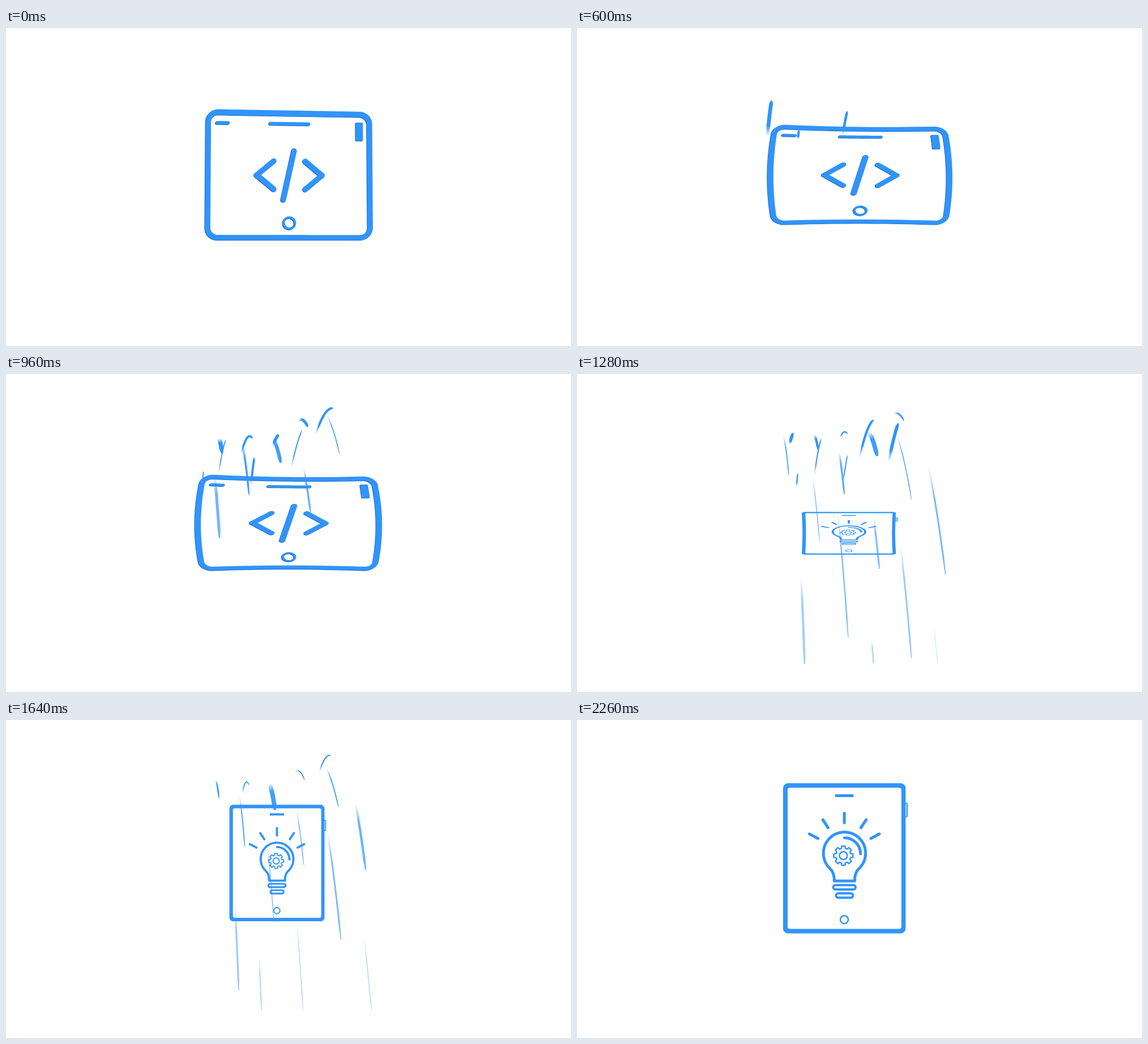
Recreate the animation shown at these times as an HTML page with a canvas. Size 998 by 561 pixels, loop 2.5 s.

```html
<!DOCTYPE html>
<html lang="en">
<head>
<meta charset="utf-8">
<title>Tablet morph</title>
<style>
html, body { margin: 0; width: 100%; height: 100%; overflow: hidden; background: #fff; }
canvas { display: block; width: 998px; height: 561px; }
</style>
</head>
<body>
<canvas id="stage" width="998" height="561"></canvas>
<script>
const ctx = document.getElementById('stage').getContext('2d');
const BLUE = '#3194fb', CLEAR = 'rgba(49,148,251,0)', SHADE = '#2272c8';
const LOOP = 2500, STEP = 40, SWAP = 1120;
const TAU = Math.PI * 2, QUARTER = Math.PI / 2;

// Smooth interpolation through [time, value] pairs.
function track(t, ...keys) {
  if (t <= keys[0][0]) return keys[0][1];
  for (let i = 1; i < keys.length; i++) {
    const [a, va] = keys[i - 1], [b, vb] = keys[i];
    if (t > b) continue;
    const u = (t - a) / (b - a);
    return va + (vb - va) * u * u * (3 - 2 * u);
  }
  return keys[keys.length - 1][1];
}

function trace(points) {
  points.forEach(([x, y], i) => i ? ctx.lineTo(x, y) : ctx.moveTo(x, y));
  ctx.closePath();
}

// ---- Outlines as point lists, so that they can be bent ----
function arc(x, y, r, from = 0, to = TAU, n = 24) {
  return Array.from({ length: n + 1 }, (_, i) => {
    const a = from + (to - from) * i / n;
    return [x + r * Math.cos(a), y + r * Math.sin(a)];
  });
}

function split(points, n = 12) {
  return points.flatMap(([x, y], i) => {
    const [p, q] = points[(i + 1) % points.length];
    const k = Math.hypot(p - x, q - y) > 20 ? n : 1;
    return Array.from({ length: k }, (_, j) => [x + (p - x) * j / k, y + (q - y) * j / k]);
  });
}

function roundBox(l, t, r, b, c) {
  const corners = [[l + c, t + c], [r - c, t + c], [r - c, b - c], [l + c, b - c]];
  return split(corners.flatMap(([x, y], i) => arc(x, y, c, (i - 2) * QUARTER, (i - 1) * QUARTER)));
}

function bar(x0, y0, x1, y1, w) {
  const a = Math.atan2(y1 - y0, x1 - x0);
  return split([...arc(x1, y1, w / 2, a - QUARTER, a + QUARTER),
    ...arc(x0, y0, w / 2, a + QUARTER, a + 3 * QUARTER)]);
}

// ---- Wide tablet with the code sign ----
const chevron = (tip, end) => [-25, 25].map(dy => [bar(tip, 258.3, end, 258.3 + dy, 9.5)]);

const landscape = [
  [roundBox(351.5, 143, 648, 374, 22), roundBox(361, 153, 638.5, 365, 13)],
  [bar(372, 166.7, 391.5, 166.7, 6)],
  [bar(467, 166.7, 535, 166.7, 6)],
  [roundBox(618.5, 162.5, 631.5, 195.5, 1.5)],
  ...chevron(443, 473), ...chevron(558.5, 529),
  [bar(509, 215, 490, 302, 9.5)],
  [arc(500.5, 343.7, 12), arc(500.5, 343.7, 8)]
];

// q > 0 squashes and bulges, q < 0 stretches.
function drawLandscape(t) {
  const q = track(t, [415, 0], [520, -0.73], [640, 1.45], [740, 0])
    + Math.max(0, (t - 760) / 200) ** 1.5;
  const size = track(t, [1000, 1], [SWAP, 0.62]);
  const cx = 499.5 - track(t, [760, 0], [960, 0.8], [SWAP, 14]);
  const cy = 258.5 + track(t, [760, 0], [960, 3.5], [SWAP, 18]);

  const bend = ([x, y]) => {
    const u = (x - 499.5) / 148, v = (y - 258.5) / 115.5;
    const sx = 1 + q * (0.05 + 0.07 * (1 - v * v));
    const sy = 1 - q * (0.26 + 0.03 * (1 - u * u));
    const tilt = 5 * (u + 1) / 2 * (1 - v) / 2;
    return [cx + u * (147.4 + 0.8 * v) * sx * size, cy + (v * 115.5 + tilt) * sy * size];
  };
  const bent = landscape.map(shape => shape.map(outline => outline.map(bend)));
  const fill = (color, dx, dy) => {
    ctx.fillStyle = color;
    ctx.save();
    ctx.translate(dx, dy);
    for (const shape of bent) {
      ctx.beginPath();
      shape.forEach(trace);
      ctx.fill('evenodd');
    }
    ctx.restore();
  };
  fill(SHADE, -1.1, 1);
  fill(BLUE, 0, 0);
}

// ---- Upright tablet with the bulb ----
function stroke(width, draw) {
  ctx.lineWidth = width;
  ctx.beginPath();
  draw();
  ctx.stroke();
}

const line = (x0, y0, x1, y1) => stroke(5, () => { ctx.moveTo(x0, y0); ctx.lineTo(x1, y1); });
const ring = (x, y, r) => stroke(2.5, () => ctx.arc(x, y, r, 0, TAU));
const pill = (x, y, w, h, r, width) => stroke(width, () => ctx.roundRect(x, y, w, h, r));

function casing(l, t, r, b, c, pinch) {
  trace(roundBox(l, t, r, b, c).map(([x, y]) => {
    const v = (y - 244) / 132;
    return [x - Math.sign(x - 472) * pinch * (1 - v * v), y];
  }));
}

function gear(x, y) {
  const teeth = Array.from({ length: 32 }, (_, i) => {
    const k = i % 4, r = k === 1 || k === 2 ? 17.2 : 13.2;
    const a = Math.floor(i / 4) * TAU / 8 + [-0.27, -0.18, 0.18, 0.27][k];
    return [x + r * Math.cos(a), y + r * Math.sin(a)];
  });
  stroke(2.5, () => trace(teeth));
  ring(x, y, 7);
}

function drawPortrait(t) {
  const s = track(t, [SWAP, 0.88], [1280, 0.77], [1640, 0.776], [2080, 1]);
  const h = track(t, [SWAP, 0.15], [1280, 0.37], [1400, 1.1], [1520, 1]);
  const x = track(t, [SWAP, 485], [1280, 480], [1640, 478.4], [2080, 472]);
  const y = track(t, [SWAP, 277], [1280, 281], [1400, 258], [1640, 252.3], [2080, 244]);
  const pinch = 3 * Math.max(0, 1 - h);

  ctx.save();
  ctx.translate(x, y);
  ctx.scale(s, s * h);
  ctx.translate(-472, -244);
  ctx.fillStyle = ctx.strokeStyle = BLUE;
  ctx.lineCap = ctx.lineJoin = 'round';

  ctx.beginPath();
  casing(364, 111.5, 580.5, 376.5, 9, pinch);
  casing(372, 119.5, 573, 368.5, 4, pinch);
  ctx.fill('evenodd');
  ctx.fillRect(456, 131, 32.5, 5);
  pill(579, 147, 4, 23.5, 1, 2.2);

  line(472.2, 164.5, 472.2, 181.5);
  for (const side of [-1, 1]) {
    line(472.5 + side * 38.3, 176, 472.5 + side * 29, 190);
    line(472.3 + side * 61.8, 201, 472.3 + side * 46.8, 209);
  }

  stroke(5, () => {
    ctx.moveTo(454.5, 284);
    ctx.quadraticCurveTo(454.5, 269, 447.5, 263);
    ctx.arc(472.5, 235, 37.3, Math.PI * 0.732, Math.PI * 2.268);
    ctx.quadraticCurveTo(490.5, 269, 490.5, 284);
    ctx.closePath();
  });
  stroke(5, () => ctx.arc(472.5, 236, 28.3, -QUARTER, 0));
  gear(470.5, 239.3);
  pill(452.5, 291.3, 39.5, 7.6, 3.8, 4);
  pill(457.5, 305.8, 30, 7.6, 3.8, 4);
  ring(472.1, 352.2, 7);
  ctx.restore();
}

// ---- Ballistic streaks: thrown up, drifting right, thinning as they fall ----
const GRAVITY = 5600, RISE = 0.18, FLOOR = 512, COUNT = 30;

function seeded(seed) {
  return () => (seed = seed * 16807 % 2147483647) / 2147483647;
}

const random = seeded(4127);
const streaks = Array.from({ length: COUNT }, (_, i) => {
  const x = 353 + 237 * (i * 0.618 % 1);
  const y = 100 - 42 * Math.exp(-(((x - 570) / 60) ** 2)) + 12 * random();
  return {
    x, y,
    peak: 700 + 960 * i / COUNT,
    drift: 40 + (x - 350) * 0.6 + 60 * random(),
    trail: 0.06 + 0.09 * random(),
    width: 1.8 + 7.5 * random() ** 2.5,
    fall: Math.sqrt(2 * (FLOOR - y) / GRAVITY)
  };
});

function drawStreak({ x, y, peak, drift, trail, width, fall }, t) {
  const now = (t - peak) / 1000;
  const head = Math.min(now, fall), tail = Math.max(now - trail, -RISE);
  if (tail >= head) return;

  const age = Math.max(0, tail) / fall;
  const n = 24, left = [], right = [];
  for (let i = 0; i <= n; i++) {
    const k = i / n, s = tail + (head - tail) * k;
    const px = x + drift * s, py = y + GRAVITY * s * s / 2;
    const speed = Math.hypot(drift, GRAVITY * s);
    const r = width / 2 * (1 - 0.6 * age) * Math.min(1, 0.5 + 2 * k, 0.5 + 4 * (1 - k));
    const nx = GRAVITY * s / speed * r, ny = drift / speed * r;
    left.push([px - nx, py + ny]);
    right.unshift([px + nx, py - ny]);
  }
  const paint = ctx.createLinearGradient(...left[0], ...left[n]);
  paint.addColorStop(0, CLEAR);
  paint.addColorStop(0.3, BLUE);
  paint.addColorStop(1, BLUE);
  ctx.globalAlpha = 1 - 0.7 * age;
  ctx.fillStyle = paint;
  ctx.beginPath();
  trace([...left, ...right]);
  ctx.fill();
  ctx.globalAlpha = 1;
}

function render(now) {
  const t = Math.floor(now % LOOP / STEP) * STEP;
  ctx.fillStyle = '#fff';
  ctx.fillRect(0, 0, 998, 561);
  t < SWAP ? drawLandscape(t) : drawPortrait(t);
  streaks.forEach(s => drawStreak(s, t));
}

let start;
function tick(now) {
  start ??= now;
  render(now - start);
  requestAnimationFrame(tick);
}
render(0);
requestAnimationFrame(tick);
</script>
</body>
</html>
```
